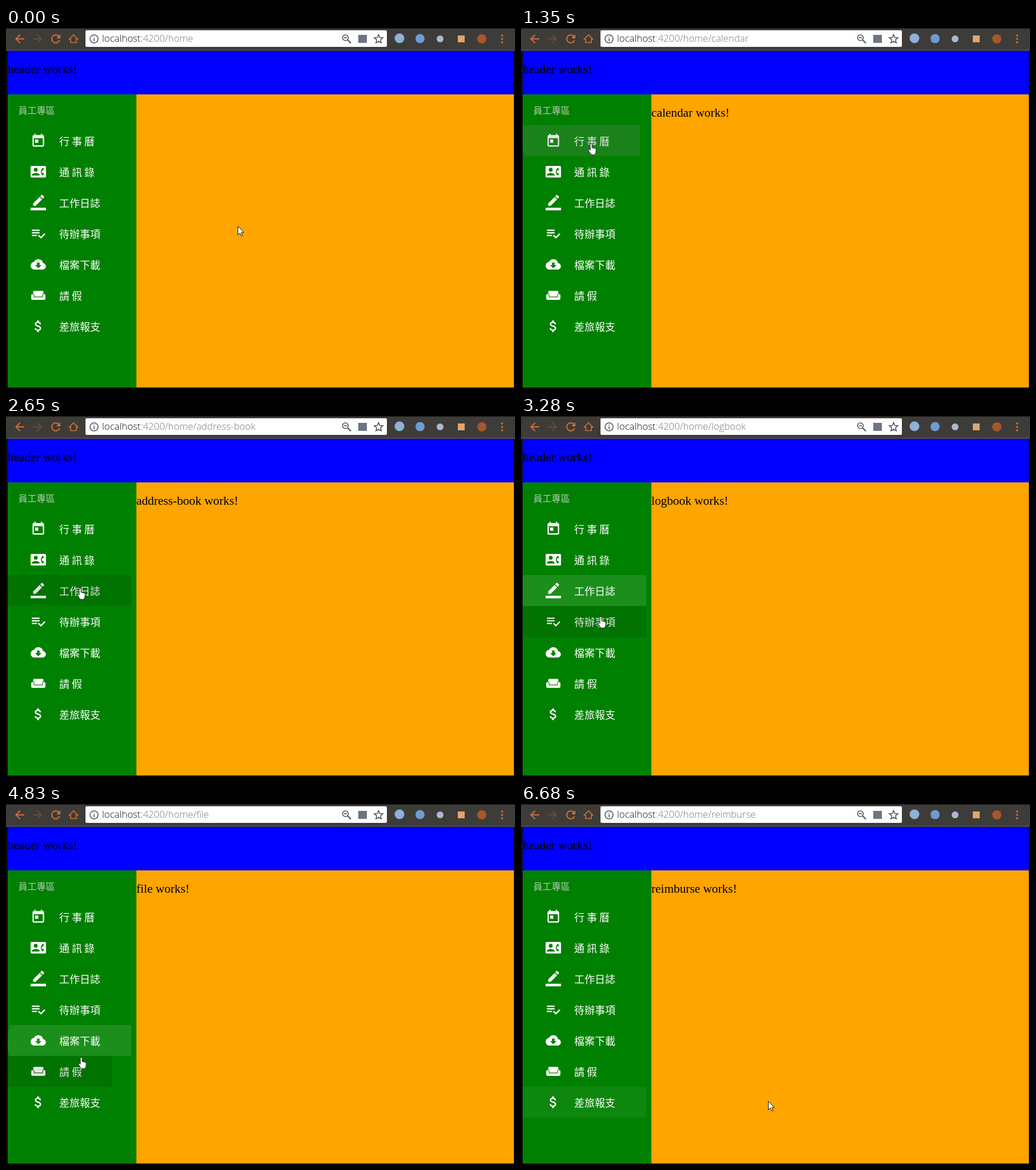
An HTML page for the animation above (6.77 s loop, 890 px wide and 629 px high).

```html
<!DOCTYPE html>
<html lang="zh-Hant">
<head>
<meta charset="utf-8">
<style>
  html, body { margin: 0; width: 100%; height: 100%; overflow: hidden; background: #000; }
  svg { display: block; }
  .url { font: 300 16.8px 'Open Sans', 'Noto Sans', sans-serif; fill: #777; }
  .page { font: 21.3px 'Liberation Serif', serif; }
  .menu { font: 300 18px 'Noto Sans CJK TC', 'Noto Sans CJK', sans-serif; fill: #fff; }
</style>
</head>
<body>
<svg id="stage" width="890" height="629" viewBox="0 0 890 629">
  <rect width="890" height="629" fill="#0b0b0a"/>
  <rect y="1" width="890" height="38" fill="#3d3c38"/>
  <rect y="38.5" width="890" height="1" fill="#77756c"/>

  <g fill="#d0713a">
    <path id="back" transform="translate(12 7)" d="M20 11H7.83l5.59-5.59L12 4l-8 8 8 8 1.41-1.41L7.83 13H20z"/>
    <path transform="translate(67 7) scale(-1 1)" opacity=".3" d="M20 11H7.83l5.59-5.59L12 4l-8 8 8 8 1.41-1.41L7.83 13H20z"/>
    <path transform="translate(75 7)" d="M17.65 6.35A8 8 0 1 0 19.73 14h-2.08A6 6 0 1 1 16.22 7.78L13 11h7V4z"/>
    <path d="M110.500 19.500l7.500-7.500 7.500 7.500h-2.500v6h-10v-6z" fill="none" stroke="#d0713a" stroke-width="1.700"/>
    <circle cx="867.500" cy="13" r="1.800"/><circle cx="867.500" cy="19" r="1.800"/><circle cx="867.500" cy="25" r="1.800"/>
  </g>

  <rect x="139" y="4" width="527" height="29" rx="2" fill="#fff"/>
  <g fill="none" stroke="#4c5360" stroke-width="1.600">
    <circle cx="154" cy="19" r="7"/>
    <path d="M154 18v5M154 15v1.600"/>
    <circle cx="593.500" cy="17" r="5"/>
    <path d="M597.500 21l5.500 5.500" stroke-width="2.200"/>
    <path d="M591 17h5"/>
    <path d="M651.500 11.500l2.100 5 5.400.5-4.100 3.600 1.200 5.300-4.600-2.800-4.600 2.800 1.200-5.300-4.100-3.600 5.400-.5z"/>
  </g>
  <rect x="616" y="12" width="15" height="14" fill="#6d7582"/>
  <circle cx="688" cy="18" r="8.500" fill="#8fb0d8"/>
  <circle cx="724" cy="18.500" r="8" fill="#6f9bd0"/>
  <circle cx="759" cy="19" r="6" fill="#a9b8d0"/>
  <rect x="790" y="13" width="12" height="12" fill="#e0a56c"/>
  <circle cx="832" cy="19" r="8" fill="#a8562c"/>

  <text class="url" x="168" y="24"><tspan fill="#111">localhost</tspan><tspan id="path"></tspan></text>

  <rect x="3" y="40" width="885" height="76" fill="#00f"/>
  <rect x="3" y="116" width="225" height="512" fill="#008000"/>
  <rect x="228" y="116" width="660" height="512" fill="#ffa500"/>
  <text class="page" x="3" y="79">header works!</text>
  <text class="page" id="content" x="228" y="155"></text>

  <g class="menu">
    <text x="21.500" y="150" font-size="16" style="font-size:16px" fill="#b0ccb0">員工專區</text>
    <g id="rows"></g>
  </g>
  <rect id="hover" x="3" height="54" fill="#000" opacity=".1"/>
  <svg id="ripple" x="3" height="54"><circle id="wave" fill="#fff"/></svg>

  <g id="cursor" fill="#fff" stroke="#111" stroke-linejoin="round">
    <path id="arrow" d="M.5.500v15l3.600-3.400 2.500 5.400 2.300-1-2.500-5.300h4.700z"/>
    <path id="hand" stroke-width=".9" d="M4 2a1.600 1.600 0 0 1 3.200 0V8l5.300 1.200q2.100.6 1.900 2.700l-.6 4.800q-.4 3.600-3.500 3.800H7.600q-2 0-3.200-2L1 13.200q-.7-1.700.5-2.200 1.100-.4 2.500 1.500z"/>
  </g>
</svg>
<script>
const LOOP = 6770, TOP = 170, ROW = 54;
const $ = id => document.getElementById(id);
const set = (el, attrs) => { for (const k in attrs) el.setAttribute(k, attrs[k]); };
const show = (el, on) => el.style.display = on ? '' : 'none';

const rows = [
  { label: '行 事 曆', route: 'calendar', width: 205,
    icon: 'M19 3h-1V1h-2v2H8V1H6v2H5a2 2 0 0 0-2 2v14a2 2 0 0 0 2 2h14a2 2 0 0 0 2-2V5a2 2 0 0 0-2-2zm0 16H5V8h14zM7 10h5v5H7z' },
  { label: '通 訊 錄', route: 'address-book', width: 205,
    icon: 'M22 3H2a2 2 0 0 0-2 2v14a2 2 0 0 0 2 2h20a2 2 0 0 0 2-2V5a2 2 0 0 0-2-2zM8 6a3 3 0 1 1 0 6 3 3 0 0 1 0-6zm6 12H2v-1c0-2 4-3.100 6-3.100s6 1.100 6 3.100zm3.850-4h1.640L21 16l-1.990 1.990a7.500 7.500 0 0 1 0-11.980L21 8l-1.510 2h-1.640a6 6 0 0 0 0 4z' },
  { label: '工作日誌', route: 'logbook', width: 216,
    icon: 'M17.750 7L14 3.250l-10 10V17h3.750zm2.960-2.960a1 1 0 0 0 0-1.410L18.370.290a1 1 0 0 0-1.410 0L15 2.250 18.750 6zM0 20h24v4H0z' },
  { label: '待辦事項', route: 'todo', width: 216,
    icon: 'M14 10H2v2h12zm0-4H2v2h12zM2 16h8v-2H2zm19.500-4.500L23 13l-6.990 7-4.510-4.500L13 14l3.010 3z' },
  { label: '檔案下載', route: 'file', width: 216,
    icon: 'M19.350 10.040A7.490 7.490 0 0 0 5.350 8.040 6 6 0 0 0 6 20h13a5 5 0 0 0 .350-9.960zM17 13l-5 5-5-5h3V9h4v4z' },
  { label: '請 假', route: 'leave', width: 183,
    icon: 'M21 10a2 2 0 0 0-2 2v3H5v-3a2 2 0 0 0-4 0v5a2 2 0 0 0 2 2h18a2 2 0 0 0 2-2v-5a2 2 0 0 0-2-2zm-3-5H6a2 2 0 0 0-2 2v2.150A3 3 0 0 1 6 11.970V14h12v-2.030a3 3 0 0 1 2-2.820V7a2 2 0 0 0-2-2z' },
  { label: '差旅報支', route: 'reimburse', width: 216,
    icon: 'M11.800 10.900c-2.270-.59-3-1.200-3-2.150 0-1.090 1.010-1.850 2.700-1.850 1.780 0 2.440.85 2.500 2.100h2.210c-.07-1.720-1.120-3.300-3.210-3.810V3h-3v2.160c-1.940.42-3.500 1.680-3.500 3.610 0 2.310 1.910 3.460 4.700 4.130 2.500.6 3 1.480 3 2.410 0 .69-.49 1.790-2.700 1.790-2.060 0-2.870-.92-2.980-2.100h-2.200c.12 2.190 1.760 3.420 3.680 3.830V21h3v-2.150c1.950-.37 3.500-1.500 3.500-3.550 0-2.840-2.430-3.810-4.700-4.400z' },
];

// Pointer moves in discrete steps; a move with a row begins with a click on it.
const moves = [
  { start: 70, end: 650, steps: 9, to: [111, 178] },
  { start: 810, end: 880, steps: 2, to: [116, 186] },
  { start: 1040, end: 1590, steps: 8, to: [121, 265], row: 0, dim: 1510, clear: 1590 },
  { start: 1960, end: 2420, steps: 7, to: [124, 300], row: 1, clear: 2650 },
  { start: 2810, end: 3280, steps: 7, to: [134, 350], row: 2, clear: 3440 },
  { start: 3660, end: 4140, steps: 7, to: [127, 415], row: 3, clear: 4340 },
  { start: 4510, end: 4980, steps: 7, to: [125, 474], row: 4, clear: 5220 },
  { start: 5450, end: 5840, steps: 6, to: [126, 522], row: 5, clear: 5990 },
  { start: 6220, end: 6680, steps: 7, to: [432, 519], row: 6, dim: 6680, clear: LOOP },
];
const home = [405, 346];
const departure = [1, .75, .45, .19];

$('rows').innerHTML = rows.map(({ label, icon }, i) => `
  <path transform="translate(43 ${TOP + 13.5 + i * ROW}) scale(1.125)" fill-rule="evenodd" d="${icon}"/>
  <text x="93" y="${TOP + 35 + i * ROW}">${label}</text>`).join('');

function progress(move, step) {
  if (move.row !== undefined) return departure[move.steps - step] || 0;
  return Math.sin(step / move.steps * Math.PI / 2);
}

function stateAt(t) {
  let pos = home, click = null;
  for (const move of moves) {
    if (t < move.start) break;
    const interval = (move.end - move.start) / (move.steps - 1);
    const step = Math.min(move.steps, Math.floor((t - move.start) / interval + 1.1));
    const p = progress(move, step), from = pos;
    pos = from.map((v, i) => Math.round(v + (move.to[i] - v) * p));
    if (move.row !== undefined) click = { move, step, at: from };
  }
  return { pos, click };
}

function drawRipple(t, click) {
  const active = click && t < click.move.clear;
  show($('ripple'), active);
  if (!active) return;
  const { move, step, at } = click, { width } = rows[move.row];
  const x = at[0] + 2, y = at[1] - TOP - move.row * ROW;
  const reach = Math.hypot(Math.max(x, width - x), Math.max(y, ROW - y));
  const grow = 1 - (1 - Math.min(1, step / 7)) ** 3;
  set($('ripple'), { y: TOP + move.row * ROW, width });
  set($('wave'), { cx: x, cy: y, r: reach * (step >= 6 ? 1 : grow), opacity: t >= move.dim ? .055 : .105 });
}

function draw(t) {
  const { pos: [x, y], click } = stateAt(t);
  const index = Math.floor((y - 2 - TOP) / ROW), row = rows[index];
  const over = !!row && x + 2 < row.width;
  show($('hover'), over);
  if (over) set($('hover'), { y: TOP + index * ROW, width: row.width });
  show($('hand'), over);
  show($('arrow'), !over);
  set($('cursor'), { transform: `translate(${x} ${y})` });

  const route = click ? rows[click.move.row].route : '';
  $('path').textContent = ':4200/home' + (route && '/' + route);
  $('content').textContent = route && route + ' works!';
  drawRipple(t, click);
}

const begin = performance.now();
function tick() {
  draw((performance.now() - begin) % LOOP);
  requestAnimationFrame(tick);
}
tick();
</script>
</body>
</html>
```
